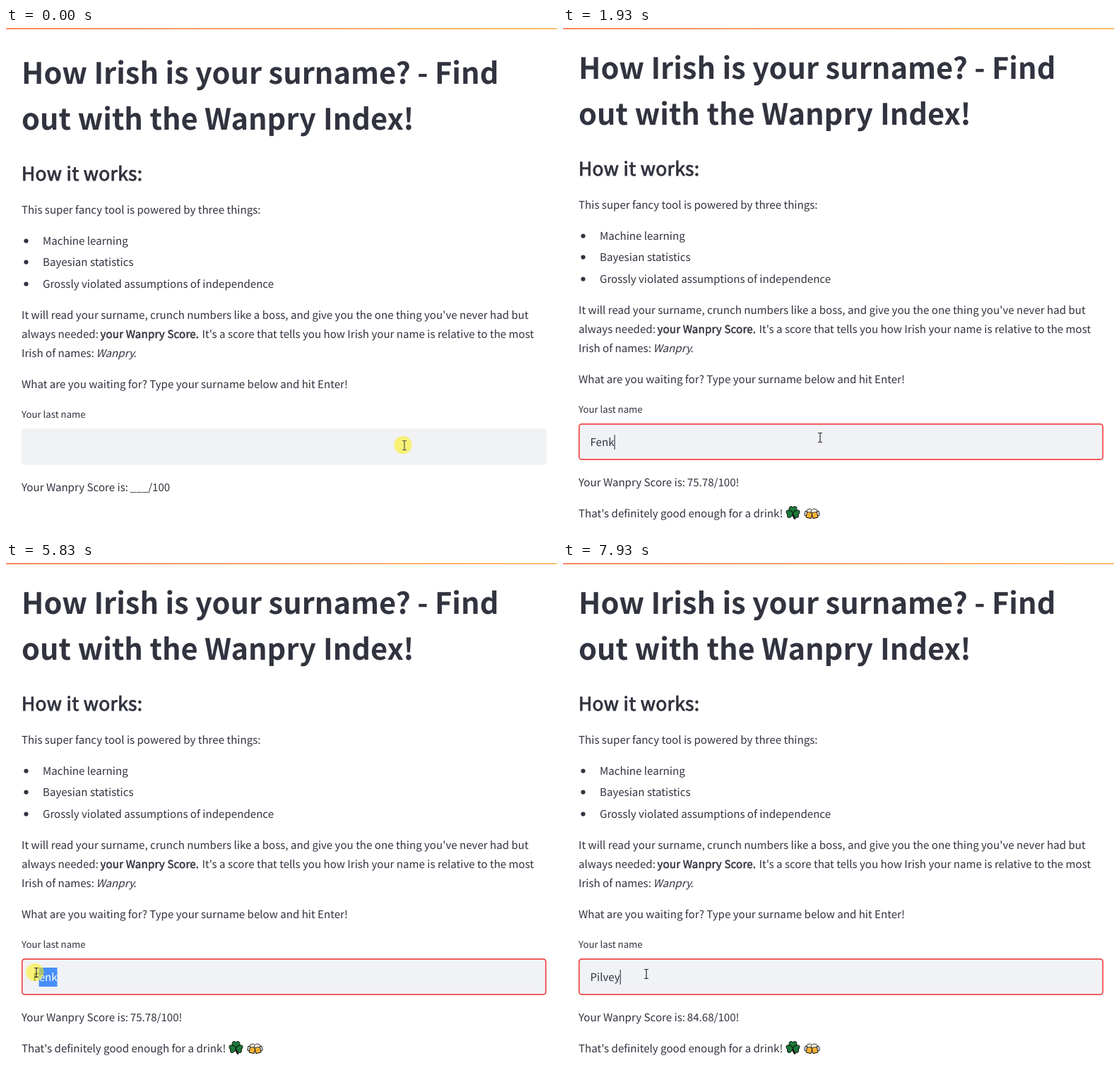
Animation, 780 px wide and 718 px high, one loop 8 s. Source, as an HTML page:

```html
<!DOCTYPE html>
<html lang="en">
<head>
<meta charset="utf-8">
<title>Surname score</title>
<style>
  html, body { margin: 0; width: 100%; height: 100%; overflow: hidden; background: #fff; }
  svg { display: block; }
  text {
    font: 15.11px "Noto Sans CJK JP", "Noto Sans CJK SC", "Noto Sans CJK", "Noto Sans", sans-serif;
    fill: #31333f; white-space: pre; text-rendering: geometricPrecision;
  }
  .h1 { font-size: 41.55px; font-weight: 700; }
  .h2 { font-size: 26.4px; letter-spacing: .36px; stroke: #31333f; stroke-width: .9px; }
  .small { font-size: 13.22px; }
  .semi { letter-spacing: .15px; stroke: #31333f; stroke-width: .5px; }
  .em { font-style: italic; }
  .ink { stroke: #111; stroke-width: 1; stroke-linejoin: round; }
</style>
</head>
<body>
<svg width="780" height="718" viewBox="0 0 780 718">
  <defs>
    <linearGradient id="bar">
      <stop offset="0" stop-color="#ff7f56"/>
      <stop offset="1" stop-color="#ffb866"/>
    </linearGradient>
    <path id="leaf" d="M0 0C-7-3-6.5-9-2.6-9Q-.6-9 0-7.4Q.6-9 2.6-9C6.5-9 7-3 0 0Z"/>
    <g id="mug" class="ink">
      <path d="M-3.5-2.5H-6.2V3.5H-3.5" fill="none"/>
      <rect x="-3.5" y="-5" width="7.5" height="11" rx="1" fill="#f8b133"/>
      <path d="M-4-2.5Q-5-6-2-6.2Q0-8.4 2.2-6.4Q5.2-6 4.5-2.8Q2-1.4 0-2.4Q-2-1-4-2.5Z" fill="#fff8e6" stroke-width=".8"/>
    </g>
  </defs>

  <g id="page">
    <g id="copy"></g>
    <rect x="22" y="567" width="743" height="52" rx="4.5" fill="#f0f2f6"/>
    <rect id="border" x="22.8" y="567.8" width="741.4" height="50.4" rx="4" fill="none" stroke="#f54545" stroke-width="1.7"/>
    <rect id="selection" y="580" height="27" fill="#468ef7"/>
    <text id="typed" x="38.5" y="599"><tspan id="plain"></tspan><tspan id="picked" fill="#fff"></tspan></text>
    <rect id="caret" y="583" width="1.1" height="21" fill="#31333f"/>
    <text x="22" y="656">Your Wanpry Score is: <tspan id="score" x="175.8"></tspan></text>
    <g id="praise">
      <text x="22" y="700">That's definitely good enough for a drink!</text>
      <g transform="translate(325.5 693.5)" fill="#1b7a37" class="ink">
        <path d="M0 0Q0 6 3.5 8.8" fill="none" stroke-width="2.6"/>
        <use href="#leaf"/>
        <use href="#leaf" transform="rotate(105)"/>
        <use href="#leaf" transform="rotate(-105)"/>
      </g>
      <use href="#mug" transform="translate(348.6 695) rotate(12)"/>
      <use href="#mug" transform="translate(356.4 695) rotate(-12) scale(-1 1)"/>
    </g>
  </g>

  <rect width="780" height="1.8" fill="url(#bar)"/>
  <g id="pointer">
    <circle id="glow" cx="-2" cy="-.5" r="12.6" fill="#fff000"/>
    <path id="beam" d="M-3-6.5H-1Q0-6.5 0-5.5Q0-6.5 1-6.5H3M0-5.5V5.5M-3 6.5H-1Q0 6.5 0 5.5Q0 6.5 1 6.5H3" fill="none" stroke-width="1.2"/>
  </g>
</svg>

<script>
const LOOP = 8000;
const SCROLL_AT = 1060, SCROLL = 7;
const TEXT_X = 38.5;
const $ = id => document.getElementById(id);
const SVG = 'http://www.w3.org/2000/svg';

function add(tag, attrs, text = '') {
  const el = document.createElementNS(SVG, tag);
  for (const key in attrs) el.setAttribute(key, attrs[key]);
  el.textContent = text;
  return $('copy').appendChild(el);
}
const line = (x, y, text, cls = '') => add('text', { x, y, class: cls }, text);

line(22, 79, 'How Irish is your surname? - Find', 'h1');
line(22, 144, 'out with the Wanpry', 'h1');
line(449, 144, 'Index!', 'h1');
line(22, 216, 'How it works:', 'h2');
line(22, 263, 'This super fancy tool is powered by three things:');
['Machine learning', 'Bayesian statistics', 'Grossly violated assumptions of independence']
  .forEach((text, i) => {
    const y = Math.round(307 + i * 30.4);
    add('circle', { cx: 28.5, cy: y - 5.5, r: 3.1, fill: '#31333f' });
    line(52, y, text);
  });
line(22, 412, "It will read your surname, crunch numbers like a boss, and give you the one thing you've never had but");
line(22, 439, 'always needed:');
line(133.6, 439, 'your Wanpry Score.', 'semi');
line(277.6, 439, "It's a score that tells you how Irish your name is relative to the most");
line(22, 466, 'Irish of names:');
line(127.6, 466, 'Wanpry', 'em');
line(180.5, 466, '.');
line(22, 510, 'What are you waiting for? Type your surname below and hit Enter!');
line(22, 552, 'Your last name', 'small');

// Pointer path: time, x, y
const PATH = [
  [0, 564, 591], [1230, 564, 591], [1430, 540, 589], [1730, 436, 583], [1930, 364, 580],
  [2030, 339, 579], [2430, 268, 576], [2830, 216, 574], [3430, 178, 583], [3730, 163, 581],
  [4630, 137, 580], [4930, 135, 580], [5530, 56, 580], [5830, 43, 580], [6430, 20, 580],
  [6530, 16, 581], [7030, 32, 581], [7230, 32, 581], [7930, 118, 582]
];
const SCORES = [
  [0, '___/100'], [1060, '64.41/100!'], [1100, '70.1/100!'], [1160, '75.78/100!'],
  [7030, '77.3/100!'], [7190, '78.6/100!'], [7210, '79.9/100!'], [7240, '84.68/100!']
];
const CARET = [[100, 500], [700, 1430], [1900, 2430], [3850, 4380], [6600, 7160], [7730, 8000]];
const FIRST = { name: 'Fenk', start: 700, gap: 65 };
const SECOND = { name: 'Pilvey', start: 6600, gap: 60 };
const PRESS = 4930, RELEASE = 6560;

const typedBy = (word, t) => word.name.slice(0, Math.max(0, Math.floor((t - word.start) / word.gap) + 1));
const within = (t, from, to) => t >= from && t < to;
const show = (el, on) => el.setAttribute('visibility', on ? 'visible' : 'hidden');

// The pointer is sampled ten times a second
function pointerAt(t) {
  const q = Math.max(0, Math.floor((t - 30) / 100) * 100 + 30);
  const next = PATH.findIndex(p => p[0] > q);
  if (next < 0) return PATH[PATH.length - 1].slice(1);
  const [t0, x0, y0] = PATH[next - 1], [t1, x1, y1] = PATH[next];
  const k = (q - t0) / (t1 - t0);
  return [x0 + (x1 - x0) * k, y0 + (y1 - y0) * k];
}

const endOf = n => n ? TEXT_X + $('typed').getSubStringLength(0, n) : TEXT_X;

function drawInput(t, px) {
  const value = typedBy(t < SECOND.start ? FIRST : SECOND, t);
  $('plain').textContent = value;
  $('picked').textContent = '';
  const end = endOf(value.length);

  // Dragging left selects every letter whose middle has been passed
  let from = value.length;
  if (within(t, PRESS, SECOND.start)) {
    while (from > 0 && (endOf(from - 1) + endOf(from)) / 2 > px + 1) from--;
  }
  const left = endOf(from);
  $('plain').textContent = value.slice(0, from);
  $('picked').textContent = value.slice(from);
  $('selection').setAttribute('x', left);
  $('selection').setAttribute('width', Math.max(0, end - left));

  $('caret').setAttribute('x', end);
  show($('caret'), CARET.some(([a, b]) => within(t, a, b)));
}

function draw(t) {
  const [px, py] = pointerAt(t);
  const fade = Math.min(1, Math.max(0, Math.floor(t / 100) / 3));
  const glow = within(t, PRESS, RELEASE) ? 1 : 1 - fade;

  $('page').setAttribute('transform', `translate(0 ${t < SCROLL_AT ? 0 : -SCROLL})`);
  $('border').setAttribute('opacity', fade);
  $('score').textContent = SCORES.filter(s => s[0] <= t).pop()[1];
  show($('praise'), t >= SCROLL_AT);
  drawInput(t, px);

  $('pointer').setAttribute('transform', `translate(${px} ${py})`);
  $('glow').setAttribute('opacity', .52 * glow);
  $('beam').setAttribute('stroke', t < 300 ? '#55554a' : t < 1310 ? '#999a9e' : '#2b2b2e');
}

function tick() {
  draw(performance.now() % LOOP);
  requestAnimationFrame(tick);
}
tick();
</script>
</body>
</html>
```
